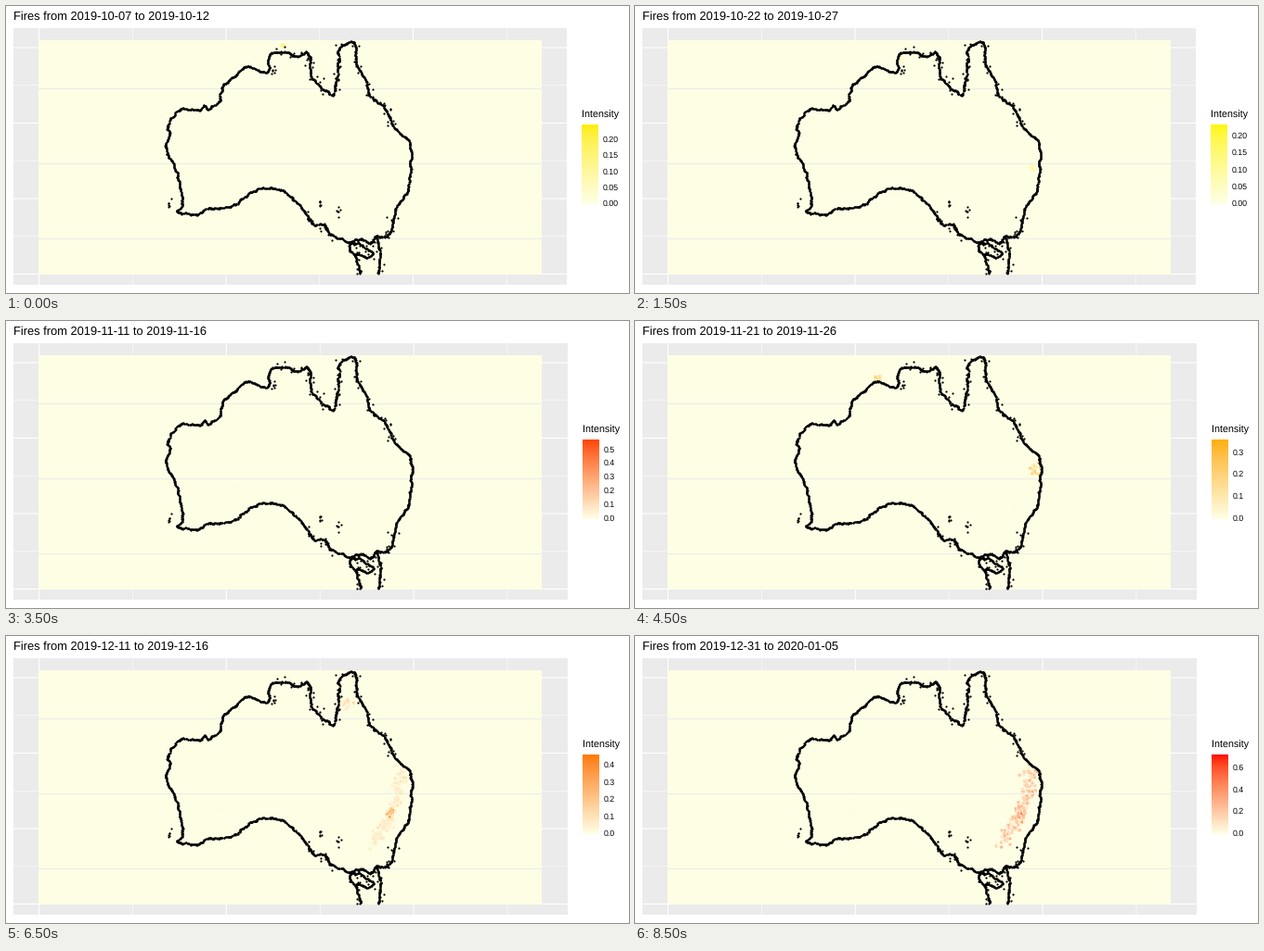
Write a matplotlib script that moves like this. It is 671 px wide and 310 px high and loops after 9000 ms.

```python
import numpy as np
import matplotlib.pyplot as plt
from matplotlib.animation import FuncAnimation
from matplotlib.colors import ListedColormap
from matplotlib.patches import Rectangle

W, H, DPI = 671, 310, 64
PT = 72 / DPI  # points per pixel
FRAMES, INTERVAL = 18, 500
START = np.datetime64("2019-10-07")
LOW = (255, 255, 229)
plt.rcParams["font.family"] = "Liberation Sans"
plt.rcParams["text.hinting"] = "none"

# Turning points of the peak intensity: window number -> value
PEAKS = {0: .249, 2: .575, 3: .235, 5: .225, 7: .575,
         9: .36, 13: .465, 15: .287, 17: .725}

# Key points, clockwise from the western cape
MAINLAND = [
    (172, 151), (176, 138), (174, 129), (187, 112), (207, 112), (213, 108),
    (219, 110), (230, 102), (232, 90), (240, 80), (247, 76), (258, 66),
    (278, 72), (283, 67), (281, 61), (285, 52), (303, 50), (312, 54),
    (326, 51), (329, 76), (349, 95), (354, 90), (358, 57), (357, 49),
    (363, 42), (375, 40), (378, 64), (386, 78), (393, 98), (407, 110),
    (418, 130), (431, 143), (435, 148), (436, 172), (432, 200), (421, 217),
    (413, 246), (398, 249), (393, 256), (386, 253), (377, 251), (371, 255),
    (349, 246), (342, 236), (331, 236), (322, 223), (306, 206), (291, 198),
    (267, 199), (243, 216), (217, 219), (205, 225), (185, 222), (190, 214),
    (184, 180), (174, 159), (172, 151)]
ISLAND_WEST = [(381, 289), (377, 274), (370, 262), (373, 256), (384, 259),
               (394, 267), (388, 271), (376, 267)]
ISLAND_EAST = [(397, 250), (403, 263), (402, 276), (401, 289)]
LONE_ISLETS = [(338, 212), (357, 223), (176, 212), (289, 71)]

# Local outbreaks: x, y, spread, window of the peak
OUTBREAKS = [
    (299, 43, 1, 0), (287, 58, 1.5, 2), (429, 175, 1.5, 3.5),
    (250, 69, 1.5, 5), (247, 178, 1.5, 5), (262, 62, 2.5, 9),
    (430, 161, 3.5, 9), (416, 190, 3, 13), (367, 72, 3, 14),
    (234, 187, 4, 15), (415, 193, 4, 17)]


def spline(path, gap=.6):
    """Catmull-Rom curve through the path, sampled about every gap pixels."""
    p = np.array([path[0], *path, path[-1]], float)
    out = []
    for a, b, c, d in zip(p, p[1:], p[2:], p[3:]):
        t = np.arange(0, 1, gap / np.hypot(*(c - b)))[:, None]
        out.append(b + .5 * t * (c - a + t * (2 * a - 5 * b + 4 * c - d
                                              + t * (3 * (b - c) + d - a))))
    return np.vstack(out)


def make_outline():
    rng = np.random.RandomState(4)
    coast = np.vstack([spline(p) for p in (MAINLAND, ISLAND_WEST, ISLAND_EAST)])
    smooth = np.ones(7) / 7
    for k in (0, 1):
        coast[:, k] += np.convolve(rng.normal(0, 1.5, len(coast)), smooth,
                                   "same")
    # islets crowd the northern, eastern and south-eastern shores
    shore = coast[(coast[:, 0] > 290) & (abs(coast[:, 1] - 175) > 45)]
    picks = shore[rng.randint(len(shore), size=130)]
    parts = [coast, picks + rng.normal(0, 3, picks.shape)]
    for spot in LONE_ISLETS:
        parts.append(rng.normal(spot, (1.3, 3), (6, 2)))
    dots = np.vstack(parts)
    return dots[(dots[:, 1] > 38) & (dots[:, 1] < 290)]


TO_XYZ = np.array([[.4124, .3576, .1805], [.2126, .7152, .0722],
                   [.0193, .1192, .9505]])
WHITE = TO_XYZ.sum(axis=1)
MIX = np.array([[0, 116, 0], [500, -500, 0], [0, 200, -200]])


def to_lab(rgb):
    c = np.array(rgb) / 255
    lin = np.where(c > .04045, ((c + .055) / 1.055) ** 2.4, c / 12.92)
    return MIX @ np.cbrt(TO_XYZ @ lin / WHITE)


def from_lab(lab):
    f = lab @ np.linalg.inv(MIX).T
    lin = np.clip((f ** 3 * WHITE) @ np.linalg.inv(TO_XYZ).T, 0, 1)
    return np.where(lin > .0031308, 1.055 * lin ** (1 / 2.4) - .055,
                    12.92 * lin)


def ramp(peak):
    """Pale yellow to a hue that reddens with the peak."""
    heat = np.clip((peak - .225) / .5, 0, 1) ** .9
    a, b = to_lab(LOW), to_lab((255, 255 * (1 - heat), 0))
    t = np.linspace(0, 1, 128)[:, None]
    return ListedColormap(np.clip(from_lab(a + (b - a) * t), 0, 1))


CELL = 1.5
GX, GY = np.meshgrid(np.arange(35, 577, CELL) + CELL / 2,
                     np.arange(37, 290, CELL) + CELL / 2)


def pulse(i, when, width):
    return np.exp(-((i - when) / width) ** 2)


def fire_spots(i, rng):
    """Centres and strengths of all fires in window i."""
    xy, power = [], []

    def add(points, level):
        xy.append(points)
        power.append(level * rng.uniform(.3, 1, len(points)))

    for x, y, spread, when in OUTBREAKS:
        count = int(2 + 4 * spread)
        add(rng.normal((x, y), spread, (count, 2)), .8 * pulse(i, when, 1.1))

    # the eastern belt bends inland and grows through the season
    u = rng.uniform(0, 1, 130)
    belt = np.column_stack([427 - 33 * u ** 2, 143 + 82 * u])
    season = np.clip((i - 6) / 9, 0, 1) ** 2.5
    add(belt + rng.normal(0, 3.5, belt.shape), .5 * season)

    # thin haze over the north and east in late December
    haze = rng.normal((365, 125), (45, 28), (220, 2))
    add(haze, .1 * pulse(i, 15, 1.2))
    return np.vstack(xy), np.concatenate(power)


def fire_grid(i):
    grid = np.zeros_like(GX)
    for (x, y), level in zip(*fire_spots(i, np.random.RandomState(100 + i))):
        if level > .01:
            r2 = (GX - x) ** 2 + (GY - y) ** 2
            grid = np.maximum(grid, level * np.exp(-r2 / 2.5))
    return grid


OUTLINE = make_outline()
fig = plt.figure(figsize=(W / DPI, H / DPI), dpi=DPI, facecolor="white")
ax = fig.add_axes([0, 0, 1, 1])


def line(xs, ys, color, width, z=2):
    ax.plot(xs, ys, color=color, lw=width * PT, snap=False, zorder=z,
            solid_capstyle="butt")


def label(x, y, text, size):
    ax.text(x, y, text, size=size * PT, color="black", va="baseline")


def draw_panel(fx, right):
    ax.add_patch(Rectangle((8, 24), right - 8, 277, fc="#ebebeb", lw=0,
                           zorder=1))
    for k in range(7):
        width = .55 if k % 2 else 1.1
        x, y = fx(35.5 + 100.75 * k), 45 + 40.75 * k
        if x < right:
            line((x, x), (24, 301), "white", width)
        line((8, right), (y, y), "white", width)


def draw_map(i, fx, cmap):
    ax.imshow(fire_grid(i), cmap=cmap, vmin=0, vmax=1, aspect="auto",
              extent=(35, 577, 290, 37), interpolation="nearest", zorder=3)
    for k in range(3):
        y = 89.5 + 81 * k
        line((35, 577), (y, y), "#ebebeb", 1, 4)
    ax.scatter(fx(OUTLINE[:, 0]), OUTLINE[:, 1], s=(2.2 * PT) ** 2,
               c="black", lw=0, zorder=5)


def draw_legend(peak, step, dx, cmap):
    left, top, base = 620.3 + dx, 128, 213.6
    label(620 + dx, 121, "Intensity", 10.8)
    ax.imshow(np.linspace(1, 0, 128)[:, None], cmap=cmap, vmin=0, vmax=1,
              aspect="auto", extent=(left, left + 17.3, base, top), zorder=3)
    digits = 2 if step < .1 else 1
    for v in np.arange(0, peak, step):
        y = base - (base - top) * v / peak
        label(643 + dx, y + 2.3, f"{v:.{digits}f}", 8.8)


def draw(i):
    ax.clear()
    ax.axis("off")
    peak = np.interp(i, list(PEAKS), list(PEAKS.values()))
    step = .05 if peak < .27 else .1 if peak < .65 else .2
    dx = 0 if step < .1 else .8  # shorter labels widen the panel
    right = 604 + dx

    def fx(x):
        return 8 + (x - 8) * (right - 8) / 596

    cmap = ramp(peak)
    draw_panel(fx, right)
    draw_map(i, fx, cmap)
    draw_legend(peak, step, dx, cmap)
    day = START + 5 * i
    label(8, 15, f"Fires from {day} to {day + 5}", 12.9)
    ax.set_xlim(0, W)
    ax.set_ylim(H, 0)
    return []


def reset():
    return draw(0)


anim = FuncAnimation(fig, draw, frames=FRAMES, init_func=reset,
                     interval=INTERVAL, repeat=True, repeat_delay=0)
plt.show()
```
